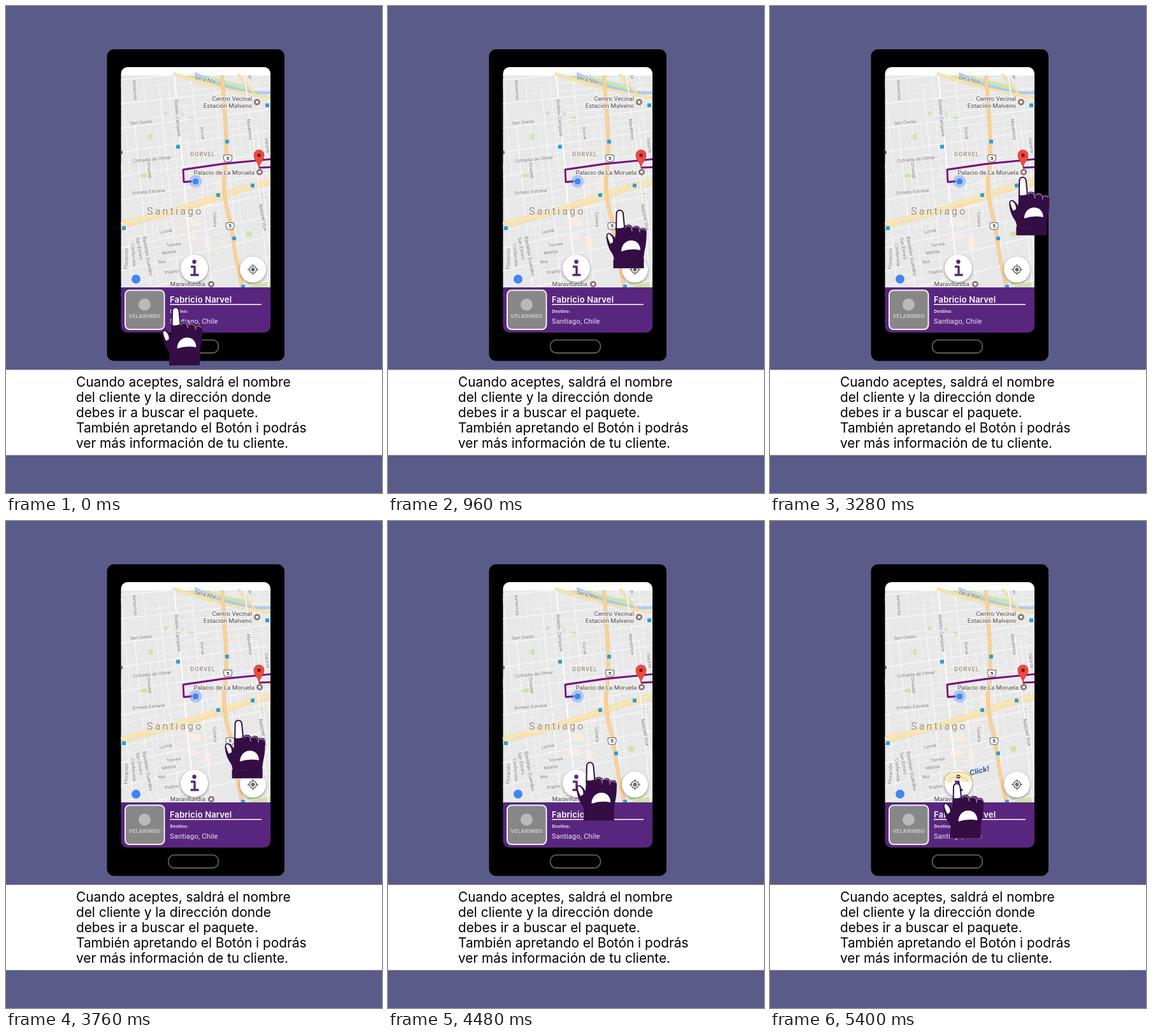
Recreate the animation shown at these times as an HTML page with a canvas. Size 590 by 765 pixels, loop 5680 ms.

```html
<!DOCTYPE html>
<html lang="es">
<head>
<meta charset="utf-8">
<title>Datos del cliente</title>
<style>
html, body { margin: 0; width: 100%; height: 100%; overflow: hidden; background: #5b5b89; }
canvas { display: block; }
</style>
</head>
<body>
<canvas id="stage" width="590" height="765"></canvas>
<script>
const W = 590, H = 765, LOOP = 5680, STEP = 40;
const INTER = 'Inter, sans-serif', ROBOTO = 'Roboto, sans-serif';
const PURPLE = '#59267f', GLOVE = '#340d44';
const view = document.getElementById('stage').getContext('2d');
const scene = document.createElement('canvas');
scene.width = W;
scene.height = H;
let g = scene.getContext('2d');

function random(seed) {
  return () => (seed = (seed * 16807) % 2147483647) / 2147483647;
}

const clamp = v => Math.max(0, Math.min(1, v));

function box(x, y, w, h, r, fill, stroke, lw) {
  g.beginPath();
  g.roundRect(x, y, w, h, r);
  paint(fill, stroke, lw);
}

function disc(x, y, r, fill, stroke, lw) {
  g.beginPath();
  g.arc(x, y, r, 0, Math.PI * 2);
  paint(fill, stroke, lw);
}

function shape(d, fill, stroke, lw) {
  const p = new Path2D(d);
  if (fill) { g.fillStyle = fill; g.fill(p); }
  if (stroke) { g.strokeStyle = stroke; g.lineWidth = lw; g.stroke(p); }
}

function paint(fill, stroke, lw) {
  if (fill) { g.fillStyle = fill; g.fill(); }
  if (stroke) { g.strokeStyle = stroke; g.lineWidth = lw; g.stroke(); }
}

function text(str, x, y, font, color, { align = 'left', rot = 0, gap = 0, halo = 0, base = 'alphabetic' } = {}) {
  g.save();
  g.translate(x, y);
  g.rotate(rot * Math.PI / 180);
  g.font = font;
  g.textAlign = align;
  g.textBaseline = base;
  g.letterSpacing = gap + 'px';
  if (halo) {
    g.lineJoin = 'round';
    g.lineWidth = halo;
    g.strokeStyle = 'rgba(245,245,245,.85)';
    g.strokeText(str, 0, 0);
  }
  g.fillStyle = color;
  g.fillText(str, 0, 0);
  g.restore();
}

function street(str, x, y, rot, size = 7.5) {
  text(str, x, y, `${size}px ${ROBOTO}`, '#777', { align: 'center', rot, halo: 2, base: 'middle' });
}

function place(str, x, y, align = 'right') {
  text(str, x, y, `9.7px ${ROBOTO}`, '#4d4846', { align, halo: 2.5 });
}

function streets() {
  const rnd = random(77);
  g.strokeStyle = '#f6f6f6';
  for (let i = 0; i < 24; i++) {
    const x = 142 + i * 12 + rnd() * 4;
    const from = i % 3 ? 109 + rnd() * 130 : 109;
    const to = i % 4 ? from + 90 + rnd() * 210 : 442;
    g.lineWidth = i % 4 ? 1 : 1.6;
    g.beginPath();
    g.moveTo(x + (from - 109) * .1, from);
    g.lineTo(x + (to - 109) * .1, to);
    g.stroke();
  }
  for (let i = 0; i < 31; i++) {
    const y = 116 + i * 12.5 + rnd() * 3;
    const slope = -.09 - i * .006;
    const from = i % 3 ? 180 + rnd() * 80 : 180;
    const to = i % 3 ? from + 70 + rnd() * 120 : 416;
    g.lineWidth = i % 3 ? 1 : 1.6;
    g.beginPath();
    g.moveTo(from, y + (from - 180) * slope);
    g.lineTo(to, y + (to - 180) * slope);
    g.stroke();
  }
}

function road(d, width, fill, edge) {
  shape(d, null, edge, width + 1.2);
  shape(d, null, fill, width);
}

function shield(x, y) {
  g.save();
  g.translate(x, y);
  shape('M-6 -5Q-3 -4 0 -5.5Q3 -4 6 -5Q8 0 5 5Q2 5 0 6Q-2 5 -5 5Q-8 0 -6 -5Z', '#fff', '#555', 1);
  text('5', 0, .5, `bold 8px ${ROBOTO}`, '#333', { align: 'center', base: 'middle' });
  g.restore();
}

function poi(x, y) {
  disc(x, y, 5, '#8b7770');
  g.fillStyle = '#fff';
  g.fillRect(x - 2, y - 1.8, 4, 3.6);
}

function drawMap() {
  g.fillStyle = '#e8e8e9';
  g.fillRect(180, 109, 236, 334);
  g.fillStyle = '#f8ebe0';
  for (const [x, y, w, h] of [[304, 300, 22, 16], [281, 333, 24, 13], [283, 358, 17, 11], [311, 362, 10, 20], [332, 268, 9, 22]])
    g.fillRect(x, y, w, h);
  g.fillStyle = '#cfe3ab';
  for (const [x, y, w, h] of [[222, 201, 8, 9], [288, 174, 8, 6], [208, 262, 20, 7], [248, 166, 5, 6], [377, 354, 9, 8], [379, 433, 36, 9], [398, 294, 10, 7], [274, 167, 7, 5]])
    g.fillRect(x, y, w, h);
  streets();

  shape('M282 109H316Q350 121 380 124L390 138Q345 136 282 109Z', '#cfe3ab');
  shape('M296 106Q330 122 360 130T416 136', null, '#a5cdf5', 4.5);
  road('M262 106Q318 125 357 133T416 144', 3, '#fbe5a8', '#eacb84');
  road('M364 107L392 140', 2.5, '#fbe5a8', '#eacb84');
  road('M264 109L275 225L278 258L284 330L297 442', 2.4, '#fff', '#e0e0e0');
  road('M180 342Q262 322 333 298T416 275', 5, '#fbe7b2', '#efd695');
  road('M180 348Q262 328 333 304T416 281', 1.3, '#fbe7b2', '#efd695');
  road('M339 109L344 180Q348 235 342 272Q341 302 351 335L362 400L371 443', 4.6, '#f9d29a', '#ecba78');
  road('M374 109L389 218L401 320L412 442', 1.4, '#fff', '#e0e0e0');

  street('Almerosa', 202, 132, 85);
  street('Rodelio Campane', 269, 176, 85);
  street('San Ovelio', 212, 183, -5);
  street('Dorvel', 308, 200, 85, 7);
  street('Maralinos', 382, 194, 83);
  street('Velorra', 409.5, 219, 82);
  street('ar', 383, 112, 80);
  street('Cofradía de Olmar', 229, 241, -6);
  street('Orvietal', 224.5, 258, 84);
  street('Ermelo Estrana', 224, 292, -5);
  street('Natorel Vux', 403, 332, 79, 8.3);
  street('Tolvera', 327.5, 335, 85);
  street('Lumié', 251, 354, -9);
  street('Torvea', 263, 375, -9);
  street('Mielsa', 255.5, 387, -9);
  street('Nur', 245, 402, -8);
  street('Pralno', 260, 418, -9);
  street('Floración', 189, 397, -88, 8);
  street('Confervela', 200, 391, 85);
  street('San Elmiro', 209, 381, 80);
  street('Bastelán Guardeo', 222, 393, 80, 8);
  text('bera Nte', 313, 116, `9px ${ROBOTO}`, '#6d6250', { align: 'center', rot: 14, halo: 2, base: 'middle' });
  text('DORVEL', 309, 236, `500 9px ${ROBOTO}`, '#9a8571', { align: 'center', gap: 1, halo: 2 });
  text('Santiago', 221, 328, `16px ${ROBOTO}`, '#9b8b7d', { gap: 3.2, halo: 2 });

  for (const [x, y] of [[270, 221], [347, 213], [410, 156], [387, 282], [333, 297], [185, 349], [358, 365], [372, 441]])
    box(x - 3, y - 3, 6, 6, 1, '#2a9fdc');
  disc(180, 230, 3, '#555');
  shield(348, 239);
  shield(351.5, 345.5);

  place('Centro Vecinal', 386, 149);
  place('Estación Malveno', 386, 160);
  place('Maravilundia', 257.5, 440, 'left');
  poi(394, 151);
  poi(322, 437);

  g.lineJoin = 'round';
  shape('M416 240.5L340 248L278 257L279 276.5L297 275M397 254L416 253', null, '#78087c', 2.8);
  place('Palacio de La Moruela', 390, 265);
  poi(398, 261);
  disc(297.5, 275.5, 10, 'rgba(80,135,230,.38)');
  disc(297.5, 275.5, 5.6, '#4285f4', '#e4edfb', 1);
  shape('M397 254C396 246 389 242 389 234A8 8 0 0 1 405 234C405 242 398 246 397 254Z', '#ed4b42', '#c33a33', .8);
  disc(397, 234.5, 2.8, '#7d1a16');
  disc(204, 429, 7, '#4285f4');
}

function roundButton(x, y, r) {
  g.save();
  g.shadowColor = 'rgba(0,0,0,.4)';
  g.shadowBlur = 4;
  g.shadowOffsetY = 1.5;
  disc(x, y, r, '#fff');
  g.restore();
}

function drawButtons() {
  roundButton(295.5, 412, 21.5);
  disc(295.5, 401.8, 3.2, PURPLE);
  shape('M290 409.5H296V422.5M289.5 422.5H302.5', null, PURPLE, 3.4);

  roundButton(387.5, 414, 20.5);
  disc(387.5, 414, 5.6, null, '#666', 1.5);
  disc(387.5, 414, 3, '#666');
  shape('M387.5 405.5V408.5M387.5 419.5V422.5M379 414H382M393 414H396', null, '#666', 1.5);
}

function drawPanel() {
  g.fillStyle = PURPLE;
  g.fillRect(180, 442, 236, 72);
  box(187, 446.5, 61.5, 61.5, 7, '#878787', '#f3f1f4', 2);
  disc(217.5, 469, 9.5, '#b9b9b9');
  text('VELARIMBO', 217.5, 490, `bold 8px ${INTER}`, '#c9c9c9', { align: 'center', gap: .3 });
  text('Fabricio Narvel', 257, 465.5, `600 13px ${INTER}`, '#fff', { gap: .15 });
  g.fillStyle = '#f4eff7';
  g.fillRect(257, 468, 144, 1.6);
  text('Destino:', 257.5, 481.5, `bold 6.6px ${INTER}`, '#eee6f3', { gap: .2 });
  text('Santiago, Chile', 257, 499, `11px ${ROBOTO}`, '#eee6f3', { gap: .2 });
}

function drawScene() {
  g.fillStyle = '#5b5b89';
  g.fillRect(0, 0, W, H);
  box(158.5, 68, 278.5, 489.5, 11, '#000');
  box(254.8, 524.7, 78.5, 20.3, 9, null, '#655c60', 1.8);
  g.save();
  g.beginPath();
  g.roundRect(180.5, 96, 234.5, 417, 10);
  g.clip();
  g.fillStyle = '#fff';
  g.fillRect(180, 96, 236, 14);
  drawMap();
  drawButtons();
  drawPanel();
  g.restore();

  g.fillStyle = '#fff';
  g.fillRect(0, 571.5, W, 134);
  [
    'Cuando aceptes, saldrá el nombre',
    'del cliente y la dirección donde',
    'debes ir a buscar el paquete.',
    'También apretando el Botón i podrás',
    'ver más información de tu cliente.'
  ].forEach((line, i) => text(line, 110, 598 + i * 24, `20.8px ${INTER}`, '#000'));
}

// Origin at the fingertip; a press brings the fist closer to it.
function drawHand(x, y, press) {
  g.save();
  g.translate(x, y);
  g.lineJoin = g.lineCap = 'round';
  shape('M-5.5 32L-5 6C-5 -1.5 5 -1.5 5.5 6L8 32Z', '#fff', GLOVE, 2);
  g.translate(0, -5 * press);
  shape('M-6 28Q0 30 7 27Q9 23 14 23Q18 23 20 27Q24 24 28 25Q31 26 32 29Q37 27 40 29Q43 32 42 40Q42 53 39 64L37 79H-9Q-9 71 -14 65Q-19 57 -21 44Q-22 36 -16 36Q-12 37 -7 45Z', GLOVE);
  shape('M-15 54Q-19 46 -20 40Q-18 34 -13 40Q-9 45 -10 51Q-12 52 -15 54Z', '#fff', GLOVE, 1.2);
  shape('M8.5 28Q12 22 18 27L19.5 33M20.5 28Q26 24 31 30L31.5 35M33 30.5Q37 28 40.5 32', null, '#e3dbe7', .9);
  shape('M2.5 65C3 43 32 42 32.5 63Q17 60 2.5 65Z', '#fff');
  shape('M-10 78Q14 80 38 76V91.5H-10Z', GLOVE);
  g.restore();
}

function drawClick(p) {
  g.save();
  g.lineCap = 'round';
  for (let i = 0; i < 4; i++) {
    g.globalAlpha = clamp(p * 4 - i);
    g.beginPath();
    g.ellipse(295, 412, 12 + i * 4, 7 + i * 3.6, 0, Math.PI * 1.08, Math.PI * 1.92);
    paint(null, i % 2 ? '#f0c044' : '#f6d983', 1.5);
  }
  g.globalAlpha = clamp(p * 2 - 1);
  text('Click!', 314, 400, `italic bold 11.5px ${INTER}`, '#345a93', { rot: -14 });
  g.restore();
}

function handAt(t) {
  // Short speed-up, then an even glide up to the place mark.
  if (t < 3240) {
    const u = Math.min(t, 1280) / STEP;
    const d = (u < 4 ? u * u / 8 : u - 2) / 30;
    return [266 + 133 * d, 473 - 208 * d];
  }
  const d = Math.min(t - 3240, 1600) / 1600;
  return [399 - 106 * d, 265 + 147 * d];
}

function frame(now) {
  const t = Math.floor((now % LOOP) / STEP) * STEP;
  const click = clamp((t - 5040) / 360);
  g.drawImage(scene, 0, 0);
  if (click) drawClick(click);
  drawHand(...handAt(t), clamp(click * 3));
  requestAnimationFrame(loop);
}

drawScene();
g = view;
const start = performance.now();
const loop = () => frame(performance.now() - start);
loop();
</script>
</body>
</html>
```
